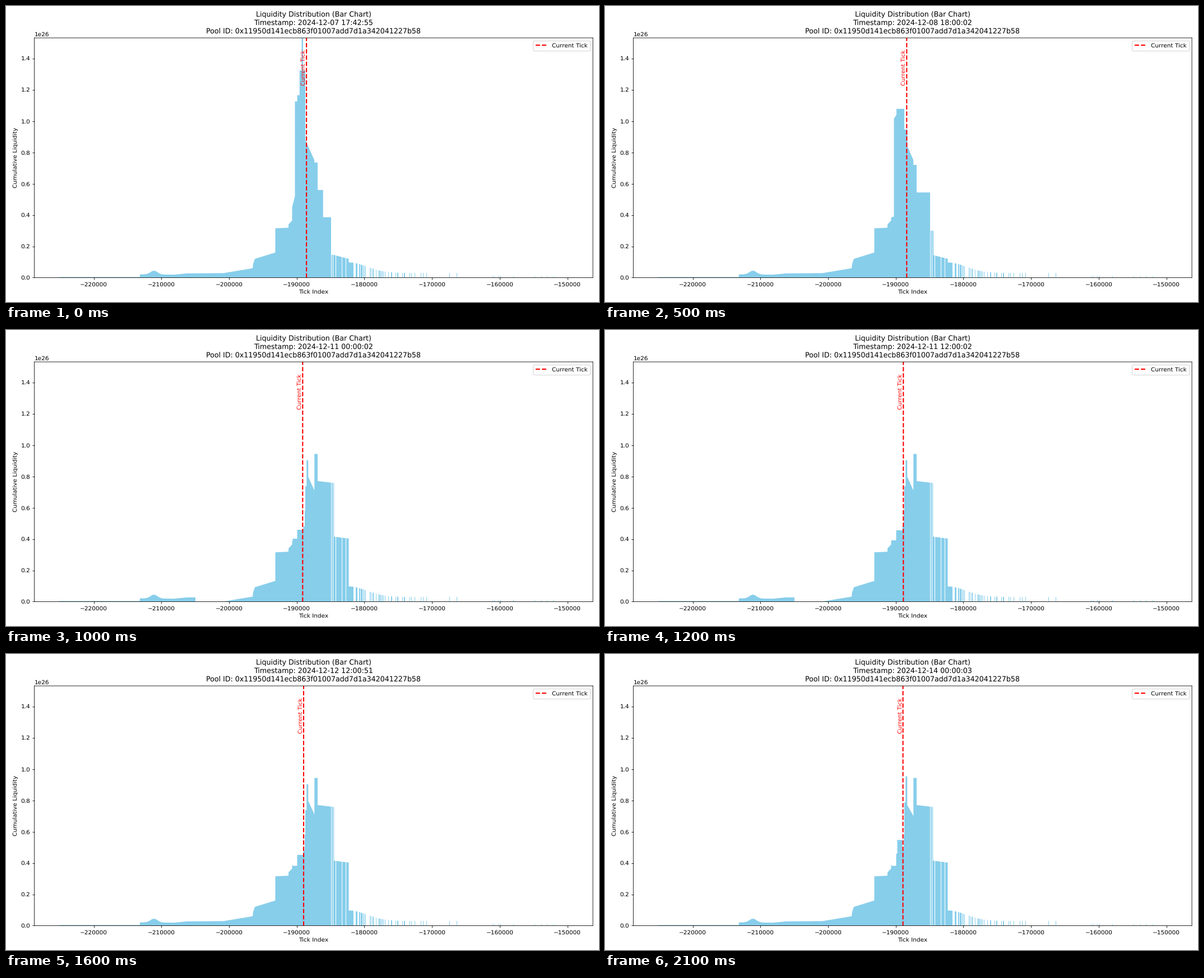
Write a matplotlib script that moves like this. It is 1058 by 529 pixels and loops after 2.2 s.

```python
import numpy as np
import matplotlib.pyplot as plt
from matplotlib.animation import FuncAnimation

W, H, DPI = 1058, 529, 75.57143
LEFT, RIGHT, TOP, BOTTOM = 50.5, 1047.1, 57.0, 485.5
Y_MAX = 1.531e26
STEPS = 22
POOL = "0x11950d141ecb863f01007add7d1a342041227b58"

# Snapshots come every 6 hours, after these steps' pauses every 12
PAUSES = (7, 8, 9, 10, 19)
DELAYS = {8: "00:03", 16: "00:51", 21: "00:03"}
WITHDRAWN = (10, 11, 12, 13, 20)   # steps without the wide low-price position

# Blocks of the central peak: stage x of the left edge -> liquidity (1e26),
# or a pair where the block slopes towards the next one
SHOULDER = {480.5: (.315, .319), 504: (.34, .365), 510.5: (.385, .39)}
LEDGE = {586: (.144, .12)}
OPENING = SHOULDER | LEDGE | {
    510.5: (.45, .52), 515.5: 1.125, 519.5: 1.165, 523.8: 1.323, 527.5: 1.531,
    530: 1.323, 534: (.88, .75), 550.3: .735, 556: .56, 565.8: .386, 580: .146,
}
PLATEAU = SHOULDER | LEDGE | {
    515.5: (1.015, 1.04), 520: 1.078, 534: .946, 539.5: (.84, .75),
    550.3: .72, 556: .544, 580.8: .3,
}
SPREAD = SHOULDER | {
    515.5: .76, 520: .82, 530.2: .838, 534: .723, 539.5: (.62, .54),
    550.3: .657, 556: (.484, .476), 585.3: (.312, .291),
}
SHIFTED = SHOULDER | {
    511.5: .402, 519.5: .459, 530.5: .48, 533: .58, 534: .737, 536.3: .903,
    539.3: (.797, .71), 550.3: .943, 556: (.77, .758), 585.3: (.415, .403),
}
REFILLED = SHIFTED | {511.5: .382, 519.5: .452}
CLOSING = REFILLED | {519.5: .46, 521.5: .547, 534: .787, 536.3: .953,
                      539.3: (.77, .7)}

# (step, line x, peak)
KEYS = [(0, 536.1, OPENING), (5, 538.3, PLATEAU), (8, 534.5, SPREAD),
        (10, 529.3, SHIFTED), (14, 535.3, REFILLED), (16, 531.0, REFILLED),
        (21, 531.6, CLOSING)]

edges = np.arange(95, 1003, .25)
mids = edges[:-1] + .125


def tick(x):
    """Tick index at a stage x."""
    return (x - 156.6) / .012071 - 220000


def flank(x):
    hump = .024 * np.exp(-((x - 264) / 9) ** 2)
    ramp = np.interp(x, [238.5, 239, 300, 322, 388, 440, 441, 444, 480],
                     [.004, .021, .019, .027, .029, .06, .088, .12, .16])
    return ramp + hump


def tail(x):
    fade = .03 + .067 * np.exp(-((x - 612) / 45) ** 2)
    return np.where(x < 868, fade, .01)


def blocks(peak, x):
    starts = sorted(peak)
    ends = starts[1:] + [611.5]
    xs, ys = [], []
    for a, b in zip(starts, ends):
        xs += [a, b - .01]
        ys += np.broadcast_to(peak[a], 2).tolist()
    return np.interp(x, xs, ys)


def sparse(x):
    """Bars are solid up to the peak's end, then ever rarer columns."""
    rng = np.random.default_rng(4)
    columns = np.arange(W)
    chance = .92 / (1 + (np.maximum(columns - 574, 0) / 75) ** 2)
    shown = (columns < 574) | (rng.random(W) < chance)
    return shown[x.astype(int)]


def profile(peak):
    heights = np.where(mids < 480.5, flank(mids), blocks(peak, mids))
    return np.where(mids < 611.5, heights, tail(mids)) * sparse(mids)


def hours(i):
    if i == 0:
        return 7 * 24 + 17.7
    return 7 * 24 + 18 + 6 * (i - 1 + sum(p <= i for p in PAUSES))


def stamp(i):
    day, hour = divmod(int(hours(i)), 24)
    clock = DELAYS.get(i, "00:02") if i else "42:55"
    return f"2024-12-{day:02d} {hour:02d}:{clock}"


key_hours = [hours(step) for step, _, _ in KEYS]
key_lines = [x for _, x, _ in KEYS]
key_bars = [profile(peak) for _, _, peak in KEYS]
low_position = np.where((mids >= 338) & (mids < 480.5), .028, 0)


def state(i):
    """Line x and bar heights at a step, blended by elapsed hours."""
    now = hours(i)
    k = min(np.searchsorted(key_hours, now, side="right") - 1, len(KEYS) - 2)
    t = (now - key_hours[k]) / (key_hours[k + 1] - key_hours[k])
    heights = (1 - t) * key_bars[k] + t * key_bars[k + 1]
    if i in WITHDRAWN:
        heights = np.maximum(heights - low_position, 0)
    return np.interp(now, key_hours, key_lines), heights * 1e26


plt.rcParams["text.hinting"] = "none"
fig = plt.figure(figsize=(14, 7), dpi=DPI)
ax = fig.add_axes([LEFT / W, 1 - BOTTOM / H,
                   (RIGHT - LEFT) / W, (BOTTOM - TOP) / H])
ax.spines[:].set_snap(False)
bars = ax.stairs(np.zeros(mids.size), tick(edges), fill=True, color="skyblue",
                 linewidth=0, snap=False)
line = ax.axvline(tick(536), color="red", linestyle="--", linewidth=2,
                  label="Current Tick", snap=False)
label = ax.text(tick(536), Y_MAX * .95, "Current Tick", color="red",
                rotation=90, ha="right", va="top")
ax.set_xlim(tick(LEFT), tick(RIGHT))
ax.set_ylim(0, Y_MAX)
ax.set_xlabel("Tick Index")
ax.set_ylabel("Cumulative Liquidity")
ax.legend(loc="upper right")


def draw(i):
    x, heights = state(i)
    bars.set_data(values=heights)
    line.set_xdata([tick(x)] * 2)
    label.set_x(tick(x))
    ax.set_title("Liquidity Distribution (Bar Chart)\n"
                 f"Timestamp: {stamp(i)}\nPool ID: {POOL}",
                 pad=7, linespacing=1.27)
    return bars, line, label


anim = FuncAnimation(fig, draw, frames=STEPS, interval=100, repeat=True)
plt.show()
```
